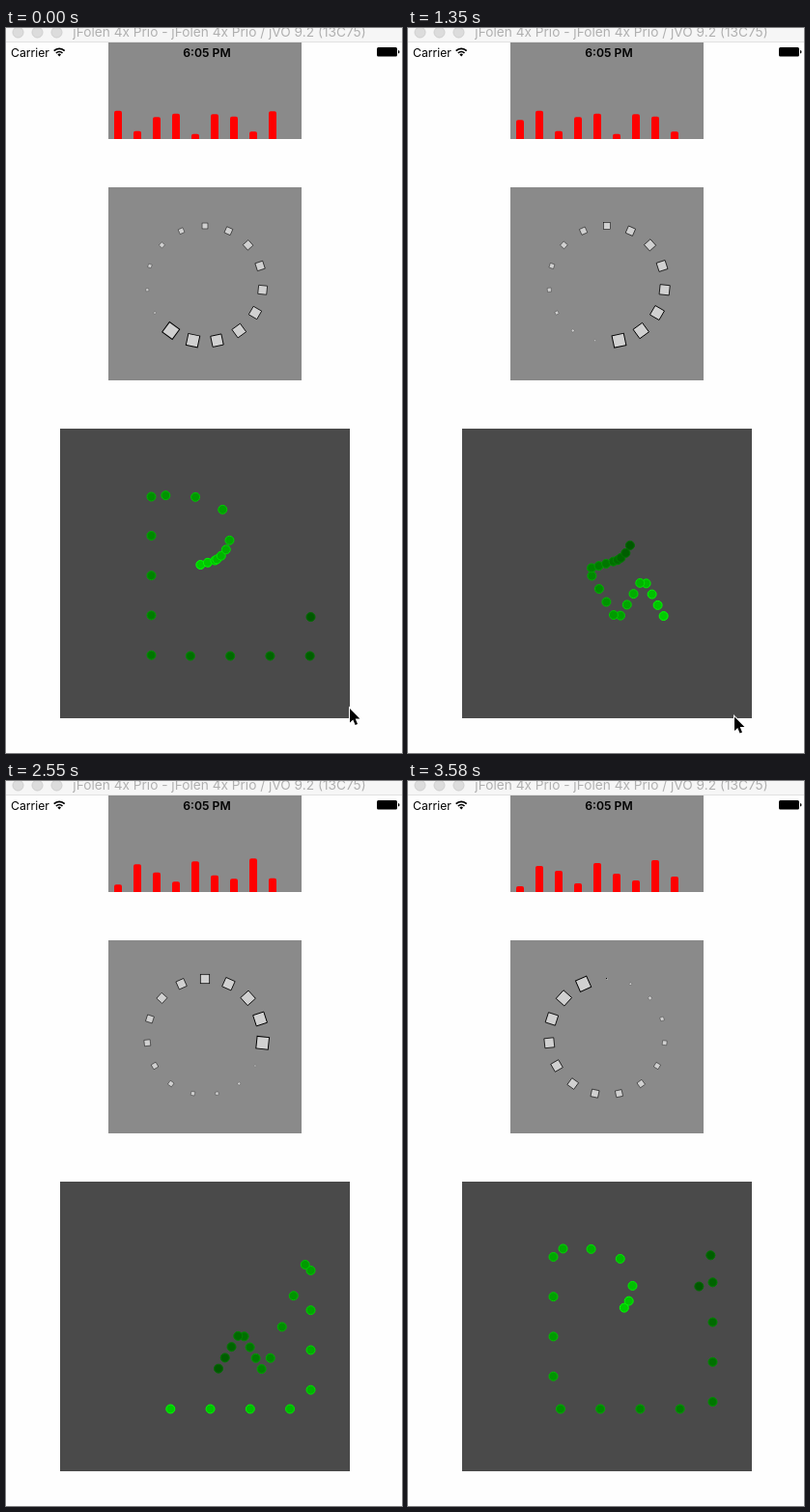
An HTML page for the animation above (3680 ms loop, 410 by 751 pixels).

```html
<!DOCTYPE html>
<html lang="en">
<head>
<meta charset="utf-8">
<title>Replicator layers</title>
<style>
  html, body { margin: 0; width: 100%; height: 100%; overflow: hidden; background: #fefefe; }
  svg { display: block; }
  text { font-family: Inter, Roboto, sans-serif; }
</style>
</head>
<body>
<svg id="stage" width="410" height="751" viewBox="0 0 410 751">
  <rect width="410" height="14" fill="#f6f6f6"/>
  <rect y="14" width="410" height="1" fill="#e2e2e2"/>
  <g fill="#dcdcdc" stroke="#cfcfcf">
    <circle cx="12.5" cy="4.5" r="5.5"/>
    <circle cx="32.5" cy="4.5" r="5.5"/>
    <circle cx="52.5" cy="4.5" r="5.5"/>
  </g>
  <text x="221" y="9" font-size="13.7" fill="#b0b0b0" text-anchor="middle">jFolen 4x Prio - jFolen 4x Prio / jVO 9.2 (13C75)</text>

  <clipPath id="barClip"><rect x="106" y="15" width="200" height="100"/></clipPath>
  <rect x="106" y="15" width="200" height="100" fill="#8a8a8a"/>
  <rect x="106" y="165" width="200" height="200" fill="#8a8a8a"/>
  <rect x="56" y="415" width="300" height="300" fill="#4a4a4a"/>

  <g id="bars" fill="#f00" clip-path="url(#barClip)"></g>
  <g id="spinner" fill="#d0d0d0" stroke="#000"></g>
  <g id="trail"></g>

  <text x="5" y="30" font-size="12.2">Carrier</text>
  <text x="208" y="30" font-size="12.2" font-weight="600" text-anchor="middle">6:05 PM</text>
  <g fill="none" stroke="#000" stroke-width="1.7">
    <path d="M49.7 23.6a7.8 7.8 0 0 1 11 0M51.9 26a4.7 4.7 0 0 1 6.6 0"/>
    <path d="M53.4 27.4a2.5 2.5 0 0 1 3.6 0L55.2 29.4z" fill="#000" stroke="none"/>
  </g>
  <rect x="384" y="20" width="21" height="9.5" rx="1.5"/>
  <path d="M406 23q1.5 .3 1.5 1.8t-1.5 1.8z"/>

  <path id="cursor" d="M0 0V14.6L3.3 11.5L5.6 17L8 16L5.7 10.6H10.4Z" stroke="#fff" paint-order="stroke" stroke-width="2"/>
</svg>
<script>
const LOOP = 3680;
// The picture is held between these moments.
const holds = Array.from({ length: 25 }, (_, k) => 150 * k - (k > 18 ? 10 : 0) - (k > 22 ? 10 : 0));
const mod = (a, n) => ((a % n) + n) % n;
const byId = id => document.getElementById(id);

function replicate(parentId, count, tag, attributes) {
  return Array.from({ length: count }, (_, i) => {
    const node = document.createElementNS("http://www.w3.org/2000/svg", tag);
    for (const [name, value] of Object.entries(attributes(i))) node.setAttribute(name, value);
    return byId(parentId).appendChild(node);
  });
}

const bars = replicate("bars", 9, "rect", i => ({ x: 112 + 20 * i, width: 8, height: 40, rx: 2 }));
const squares = replicate("spinner", 15, "rect", () => ({ x: -6.5, y: -6.5, width: 13, height: 13 }));
const dots = replicate("trail", 20, "circle", i => {
  const green = 1 - 0.03 * i;
  return { r: 4.5, fill: `rgb(0,${204 * green},0)`, stroke: `rgb(0,${255 * green},0)` };
});

// Closed route of the dots; every segment takes the same time.
// A segment is an end point, or two control points and an end point.
const start = [31.5, 78.5];
const segments = [
  [31.5, 23.5],
  [31.5, 23.5, 62.46, 18.69, 58.5, 38.5],
  [57.5, 43.5, 53.5, 45.5, 53.5, 45.5],
  [43.5, 48.5],
  [53.5, 66.5],
  [62.5, 51.5],
  [70.5, 66.5],
  [86.5, 23.5],
  [86.5, 78.5],
  start
];

function routePoint(position) {
  const p = mod(position, segments.length);
  const index = Math.floor(p), u = p - index, v = 1 - u;
  const from = index ? segments[index - 1].slice(-2) : start;
  const s = segments[index];
  return [0, 1].map(axis => s.length === 2
    ? v * from[axis] + u * s[axis]
    : v ** 3 * from[axis] + 3 * v * v * u * s[axis] + 3 * v * u * u * s[axis + 2] + u ** 3 * s[axis + 4]);
}

// Pointer position per hold; it leaves after the last one.
const still = [341, 714.5];
const pointer = [[356, 705], [350, 711], [346, 713], [342, 715], still, still, still, still, still,
  [338, 713.5], [341, 714], [365, 716]];

function draw(seconds, hold) {
  bars.forEach((bar, i) => {
    const phase = mod(0.405 + seconds - 0.35 * i, 1);
    bar.setAttribute("y", 110 - 60 * Math.min(phase, 1 - phase));
  });
  squares.forEach((square, i) => {
    const phase = mod(0.91 + seconds - 0.1 * i, 1.5) / 1.5;
    square.setAttribute("transform", `translate(206 265) rotate(${24 * i}) translate(0 -60) scale(${1 - 0.9 * phase})`);
  });
  dots.forEach((dot, i) => {
    const [x, y] = routePoint(3.505 + 2.5 * seconds - 0.25 * i);
    dot.setAttribute("cx", 56 + 3 * x);
    dot.setAttribute("cy", 415 + 3 * y);
  });
  const tip = pointer[hold];
  byId("cursor").setAttribute("visibility", tip ? "visible" : "hidden");
  if (tip) byId("cursor").setAttribute("transform", `translate(${tip})`);
}

const begin = performance.now();
function tick() {
  const time = (performance.now() - begin) % LOOP;
  const hold = holds.filter(moment => moment <= time).length - 1;
  draw(holds[hold] / 1000, hold);
  requestAnimationFrame(tick);
}
tick();
</script>
</body>
</html>
```
